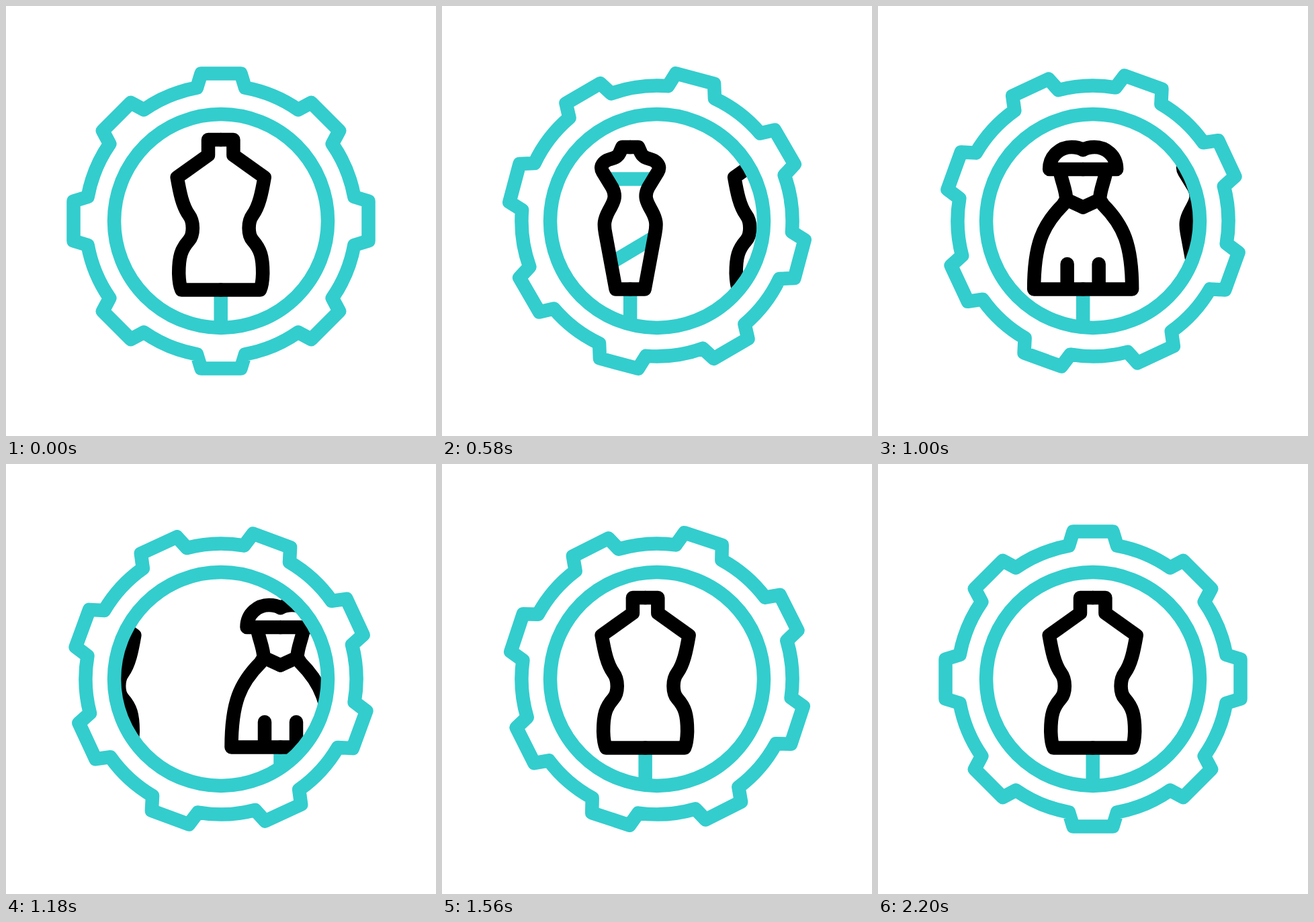
Recreate the animation shown at these times as an HTML page. Size 640 by 640 pixels, loop 2.4 s.

```html
<!DOCTYPE html>
<html lang="en">
<head>
<meta charset="utf-8">
<title>Dress forms in a gear</title>
<style>
  html, body { margin: 0; width: 100%; height: 100%; overflow: hidden; background: #fff; }
  svg { display: block; width: 100vw; height: 100vh; }
  g, path, circle { fill: none; stroke-width: 20.5; stroke-linejoin: round; }
  .teal { stroke: #33cdcd; }
  .black { stroke: #000; stroke-linecap: round; }
</style>
</head>
<body>
<svg viewBox="0 0 640 640">
  <defs>
    <clipPath id="window"><circle cx="320" cy="320" r="159"/></clipPath>
    <!-- Left halves, mirrored about x = 0 -->
    <path id="torsoHalf" d="M0 199H-18.7V222L-65 255C-61 278 -57 298 -47.5 311C-40 321 -40 340 -47.5 349C-59 362 -62.5 373 -62.5 398Q-62 415 -58.5 422.5H0"/>
    <path id="gownHalf" d="M0 210H-12L-16 219C-21 229 -32 226 -38 232Q-46 239 -41 247L-27 270C-20 283 -24 291 -32 305C-39 318 -39.5 325 -37 338L-21.5 421.5H0"/>
    <path id="bridalHalf" d="M0 214Q-7 210 -17 210C-33 210 -50 222 -50 243H0M-34 248C-31 263 -25 275 -25 288L0 299.5M-25 288L-30 296C-60 326 -73 355 -73 421.5H0M-23.5 384V421"/>
    <path id="pole" class="teal" d="M0 422V480"/>
    <g id="torso">
      <use href="#pole"/>
      <g class="black"><use href="#torsoHalf"/><use href="#torsoHalf" transform="scale(-1 1)"/></g>
    </g>
    <g id="gown">
      <use href="#pole"/>
      <path class="teal" d="M-32 257.5H32M-28 382L35 344.5"/>
      <g class="black"><use href="#gownHalf"/><use href="#gownHalf" transform="scale(-1 1)"/></g>
    </g>
    <g id="bridal">
      <use href="#pole"/>
      <g class="black"><use href="#bridalHalf"/><use href="#bridalHalf" transform="scale(-1 1)"/></g>
    </g>
  </defs>
  <g clip-path="url(#window)">
    <use class="item" href="#torso"/>
    <use class="item" href="#gown"/>
    <use class="item" href="#bridal"/>
    <use class="item" href="#torso"/>
  </g>
  <circle class="teal" cx="320" cy="320" r="159"/>
  <path id="gear" class="teal"/>
</svg>
<script>
  const LOOP = 2400, TURN = 2200, STEP = 20, CENTER = 319.7;
  const gear = document.getElementById('gear');
  const items = document.querySelectorAll('.item');

  // One entry per item: start and duration in ms, first and last offset in px
  const moves = [
    [0, 1420, 0, 500],
    [0, 1420, -220, 280],
    [280, 1490, -282, 282],
    [334, 1369, -600, 0]
  ];

  function gearPath() {
    const tooth = [[-36, -198.3], [-29.5, -219.5], [29.5, -219.5], [36, -198.3]];
    let d = '';
    for (let i = 0; i < 8; i++) {
      const c = Math.cos(i * Math.PI / 4), s = Math.sin(i * Math.PI / 4);
      tooth.forEach(([x, y], k) => {
        const lead = k ? 'L' : i ? 'A201.5 201.5 0 0 1 ' : 'M';
        d += `${lead}${(x * c - y * s).toFixed(2)} ${(x * s + y * c).toFixed(2)}`;
      });
    }
    return d + 'A201.5 201.5 0 0 1 -36 -198.3Z';
  }

  // cubic-bezier(.35, 0, .65, 1)
  function ease(x) {
    x = Math.min(1, Math.max(0, x));
    let s = x;
    for (let i = 0; i < 5; i++) s = x - 0.05 * s * (1 - s) * (1 - 2 * s);
    return s * s * (3 - 2 * s);
  }

  function draw(now) {
    const t = Math.floor((now % LOOP) / STEP) * STEP;
    gear.setAttribute('transform', `translate(320 320) rotate(${360 * ease(t / TURN)})`);
    moves.forEach(([start, duration, from, to], i) => {
      const x = CENTER + from + (to - from) * ease((t - start) / duration);
      items[i].setAttribute('transform', `translate(${x} 0)`);
    });
  }

  function tick() {
    draw(performance.now());
    requestAnimationFrame(tick);
  }

  gear.setAttribute('d', gearPath());
  tick();
</script>
</body>
</html>
```
